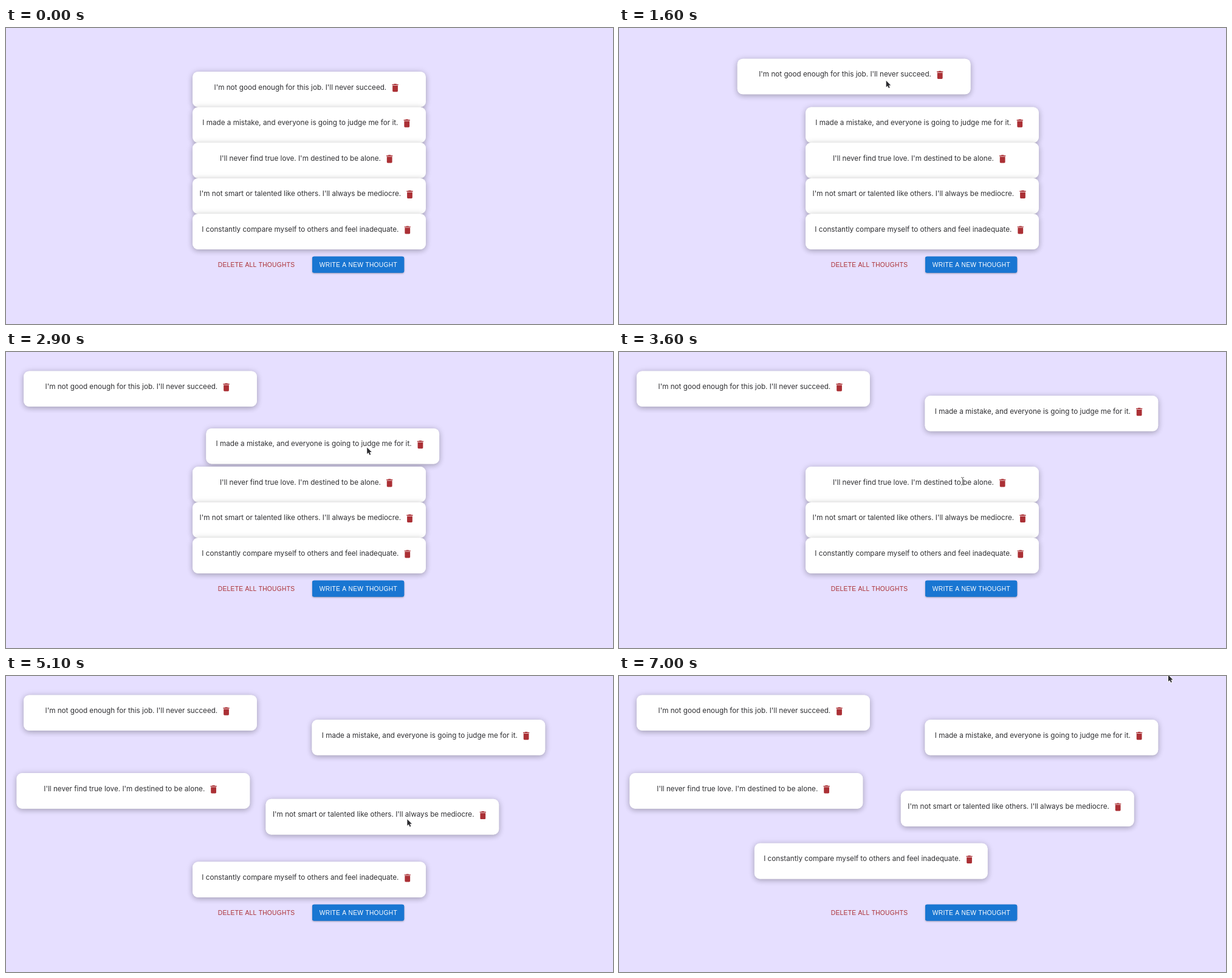
These frames come from a looping animation (999 px wide and 488 px high, 7400 ms). An HTML page with a canvas:

```html
<!DOCTYPE html>
<html lang="en">
<head>
<meta charset="utf-8">
<title>Thought board</title>
<style>
  html, body { margin: 0; width: 100%; height: 100%; overflow: hidden; background: #e6dfff; }
  canvas { display: block; width: 999px; height: 488px; }
</style>
</head>
<body>
<canvas id="stage" width="999" height="488"></canvas>
<script>
const ctx = document.getElementById('stage').getContext('2d');
const LOOP = 7400, STEP = 100, REST = 100;
const UI = 0.731; // page zoom
const RED = '#ab3035';
const CARD = { x: 307.1, y: 71.9, w: 383.8, h: 58.6, r: 9 };
const ICON_BOX = 40 * UI;
const BODY_FONT = `${16 * UI}px Inter, sans-serif`;
const BUTTON_FONT = `${14 * UI}px "Liberation Sans", Arial, sans-serif`;

// Each card is picked up at `grab`, then carried by `shift`; `bow` bends the path.
const thoughts = [
  { text: "I'm not good enough for this job. I'll never succeed.",
    start: 1380, end: 1885, grab: [552, 108], shift: [-278, -40.5], bow: -5 },
  { text: 'I made a mistake, and everyone is going to judge me for it.',
    start: 2810, end: 3240, grab: [572, 162], shift: [196.4, -58.5], bow: 5 },
  { text: "I'll never find true love. I'm destined to be alone.",
    start: 3790, end: 4250, grab: [525.5, 234.5], shift: [-289.6, -29], bow: 0 },
  { text: "I'm not smart or talented like others. I'll always be mediocre.",
    start: 4880, end: 5200, grab: [540, 281], shift: [156.7, -58.4], bow: 0 },
  { text: 'I constantly compare myself to others and feel inadequate.',
    start: 5650, end: 6050, grab: [517.5, 337.2], shift: [-84.2, -30.5], bow: 0 }
];

const trash = new Path2D('M6 19c0 1.1.9 2 2 2h8c1.1 0 2-.9 2-2V7H6zM19 4h-3.5l-1-1h-5l-1 1H5v2h14z');
const arrow = new Path2D('M0 0V10.6L2.5 8.4L4.2 12.3L6 11.5L4.3 7.7H7.6Z');
const beam = new Path2D('M-2.5 -6H-.6L0 -5.4L.6 -6H2.5M0 -5.4V5.4M-2.5 6H-.6L0 5.4L.6 6H2.5');

const add = (a, b) => [a[0] + b[0], a[1] + b[1]];

function ease(t, start, end) {
  const p = Math.min(1, Math.max(0, (t - start) / (end - start)));
  return p * p * (3 - 2 * p);
}

function dragOffset({ start, end, shift, bow }, t) {
  const p = ease(t, start, end);
  return [shift[0] * p, shift[1] * p + bow * 4 * p * (1 - p)];
}

// The pointer carries a card, rests, glides to the next one, and finally leaves.
function pointerAt(t) {
  const next = thoughts.findIndex(card => t < card.end);
  const last = thoughts[(next < 0 ? thoughts.length : next) - 1];
  const card = thoughts[next];
  if (card && t >= card.start) return add(card.grab, dragOffset(card, t));

  const from = last ? add(last.grab, last.shift) : [580, 458];
  const to = card ? card.grab : [904, -1.5];
  const leave = last ? last.end + REST : 0;
  const arrive = !last ? 700 : card ? card.start - REST : 7000;
  const p = ease(t, leave, arrive);
  return from.map((v, i) => v + (to[i] - v) * p);
}

function raisedBox(x, y, w, h, r, fill, shadows) {
  ctx.save();
  ctx.fillStyle = fill;
  ctx.beginPath();
  ctx.roundRect(x, y, w, h, r);
  for (const [dy, blur, alpha] of shadows) {
    ctx.shadowColor = `rgba(0,0,0,${alpha})`;
    ctx.shadowOffsetY = dy * UI;
    ctx.shadowBlur = blur * UI;
    ctx.fill();
  }
  ctx.restore();
}

function drawThought(card, i, t) {
  const [x, y] = add([CARD.x, CARD.y + i * CARD.h], dragOffset(card, t));
  raisedBox(x, y, CARD.w, CARD.h, CARD.r, '#fff', [[4, 12, 0.18], [1, 16, 0.14]]);

  ctx.font = BODY_FONT;
  ctx.letterSpacing = '0px';
  ctx.fillStyle = '#303033';
  const width = ctx.measureText(card.text).width;
  const left = x + (CARD.w - width - ICON_BOX) / 2;
  ctx.fillText(card.text, left, y + 29.6);

  ctx.save();
  ctx.translate(left + width + ICON_BOX / 2 - 0.3, y + 26.7);
  ctx.scale(UI, UI);
  ctx.translate(-12, -12);
  ctx.fillStyle = RED;
  ctx.fill(trash);
  ctx.restore();
}

function drawButtons() {
  raisedBox(504, 376.8, 151.2, 26.8, 3, '#1976d2', [[2, 3, 0.16], [1, 5, 0.14]]);
  ctx.font = BUTTON_FONT;
  ctx.letterSpacing = `${0.4 * UI}px`;
  ctx.fillStyle = RED;
  ctx.fillText('DELETE ALL THOUGHTS', 348.8, 393.8);
  ctx.fillStyle = '#fff';
  ctx.fillText('WRITE A NEW THOUGHT', 515.8, 393.8);
}

function drawPointer(t) {
  if (t < 100) return;
  const [x, y] = pointerAt(t);
  ctx.save();
  ctx.translate(x, y);
  if (t >= 3600 && t < 3700) { // hovering over text
    ctx.strokeStyle = '#555';
    ctx.lineWidth = 1;
    ctx.stroke(beam);
  } else {
    ctx.strokeStyle = '#fff';
    ctx.lineWidth = 1.6;
    ctx.lineJoin = 'round';
    ctx.stroke(arrow);
    ctx.fillStyle = '#2a2a2e';
    ctx.fill(arrow);
  }
  ctx.restore();
}

function draw(now) {
  const t = Math.floor((now % LOOP) / STEP) * STEP;
  ctx.fillStyle = '#e6dfff';
  ctx.fillRect(0, 0, 999, 488);
  drawButtons();
  thoughts.forEach((card, i) => drawThought(card, i, t));
  drawPointer(t);
}

const origin = performance.now();
function tick() {
  draw(performance.now() - origin);
  requestAnimationFrame(tick);
}
tick();
</script>
</body>
</html>
```
